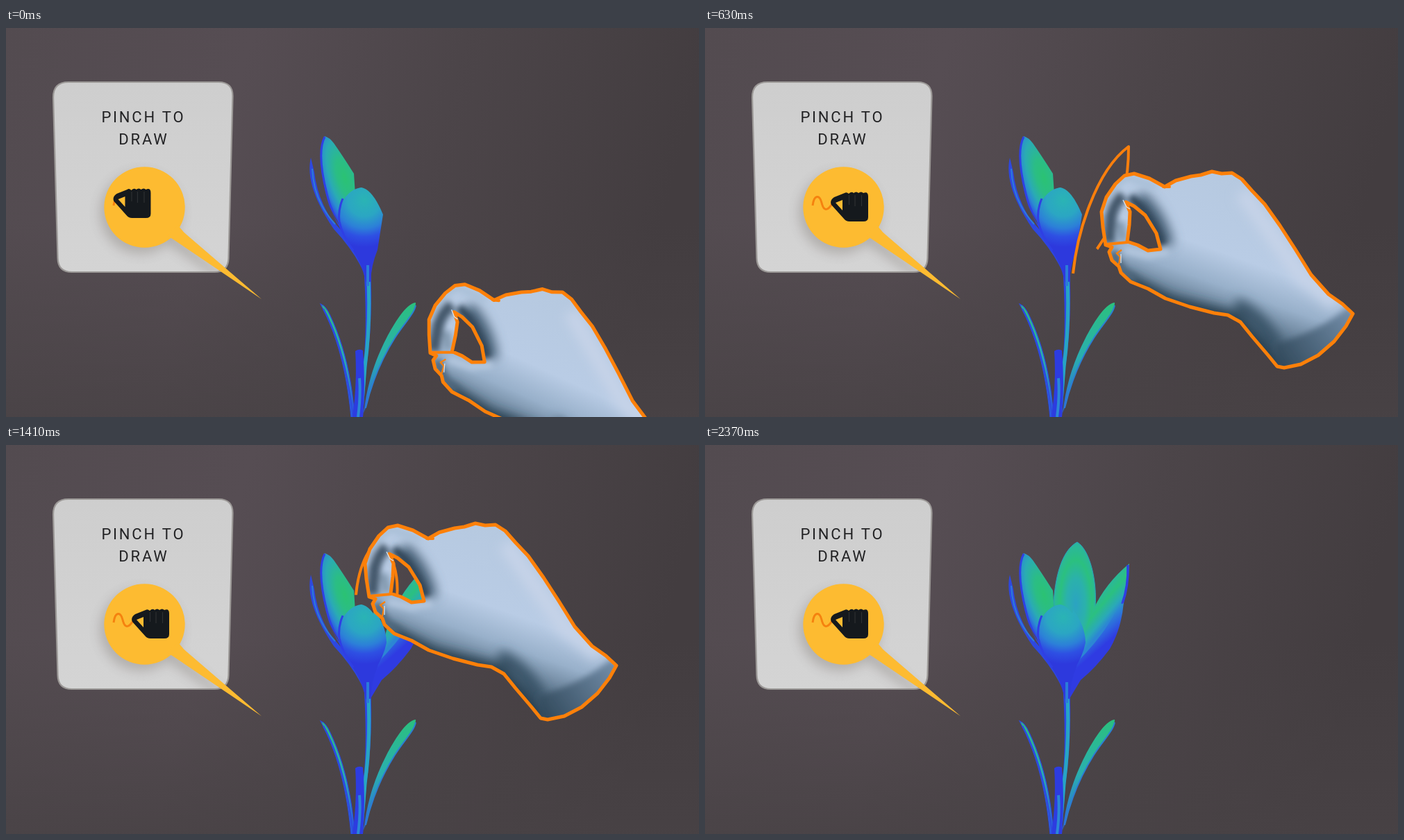
An HTML page that plays this animation: 998 px wide and 561 px high, repeating every 2.4 s.

```html
<!DOCTYPE html>
<html lang="en">
<head>
<meta charset="utf-8">
<title>Pinch to draw</title>
<style>
html, body { margin: 0; width: 100%; height: 100%; overflow: hidden; background: #4d464a; }
svg { display: block; width: 100vw; height: 100vh; }
text { font: 22px Roboto, sans-serif; letter-spacing: 2.8px; fill: #222224; }
.trail { fill: none; stroke: #fb7f0c; stroke-width: 4; stroke-linejoin: round; }
</style>
</head>
<body>
<svg viewBox="0 0 998 561" preserveAspectRatio="none">
<defs>
  <linearGradient id="bg" x1="0" y1="0" x2="1" y2=".15">
    <stop offset="0" stop-color="#534b50"/><stop offset=".35" stop-color="#564d53"/>
    <stop offset=".65" stop-color="#4c4549"/><stop offset="1" stop-color="#433d40"/>
  </linearGradient>
  <linearGradient id="floor" x1="0" y1="0" x2="0" y2="1">
    <stop offset=".5" stop-color="#484245" stop-opacity="0"/><stop offset="1" stop-color="#484245" stop-opacity=".85"/>
  </linearGradient>
  <linearGradient id="card" x1="0" y1="0" x2="0" y2="1">
    <stop offset="0" stop-color="#cecece"/><stop offset="1" stop-color="#d4d4d4"/>
  </linearGradient>
  <radialGradient id="bud" gradientUnits="userSpaceOnUse" cx="516" cy="248" r="68">
    <stop offset="0" stop-color="#2ab4b4"/><stop offset=".35" stop-color="#2ba6c3"/>
    <stop offset=".6" stop-color="#2c80d8"/><stop offset=".78" stop-color="#2e50e3"/><stop offset="1" stop-color="#2d39dd"/>
  </radialGradient>
  <radialGradient id="petalL" gradientUnits="userSpaceOnUse" cx="0" cy="0" r="1" gradientTransform="translate(488 216) rotate(-18) scale(36 92)">
    <stop offset="0" stop-color="#2bc273"/><stop offset=".3" stop-color="#2bbd85"/>
    <stop offset=".6" stop-color="#2aabb4"/><stop offset=".8" stop-color="#2b8ad2"/><stop offset="1" stop-color="#2f49e5"/>
  </radialGradient>
  <radialGradient id="petalC" gradientUnits="userSpaceOnUse" cx="0" cy="0" r="1" gradientTransform="translate(534 230) scale(34 94)">
    <stop offset="0" stop-color="#2ba3c2"/><stop offset=".4" stop-color="#2bb1ab"/>
    <stop offset=".68" stop-color="#2bc07f"/><stop offset="1" stop-color="#2bb3a6"/>
  </radialGradient>
  <linearGradient id="petalR" gradientUnits="userSpaceOnUse" x1="560" y1="215" x2="592" y2="242">
    <stop offset="0" stop-color="#2bb2a8"/><stop offset=".45" stop-color="#2bc080"/>
    <stop offset=".8" stop-color="#2aa9b8"/><stop offset="1" stop-color="#2c86d4"/>
  </linearGradient>
  <linearGradient id="flap" gradientUnits="userSpaceOnUse" x1="558" y1="262" x2="582" y2="290">
    <stop offset="0" stop-color="#2b98cb"/><stop offset=".45" stop-color="#2d68de"/><stop offset=".85" stop-color="#2f3be2"/>
  </linearGradient>
  <linearGradient id="leaf" x1="0" y1="0" x2="0" y2="1">
    <stop offset="0" stop-color="#2bc07e"/><stop offset=".5" stop-color="#2aaeb0"/><stop offset="1" stop-color="#2c62de"/>
  </linearGradient>
  <linearGradient id="skin" gradientUnits="userSpaceOnUse" x1="730" y1="195" x2="660" y2="392">
    <stop offset="0" stop-color="#b6c9e0"/><stop offset=".5" stop-color="#b9cce5"/>
    <stop offset=".72" stop-color="#98b0ca"/><stop offset="1" stop-color="#4a6378"/>
  </linearGradient>
  <linearGradient id="cuff" gradientUnits="userSpaceOnUse" x1="895" y1="390" x2="795" y2="460">
    <stop offset="0" stop-color="#6f89a4"/><stop offset="1" stop-color="#30485a"/>
  </linearGradient>
  <filter id="soft" x="-50%" y="-50%" width="200%" height="200%"><feGaussianBlur stdDeviation="8"/></filter>
  <filter id="soft2" x="-50%" y="-50%" width="200%" height="200%"><feGaussianBlur stdDeviation="4"/></filter>
  <path id="handShape" d="M549 291L545 265L543 243L550 222L563 203L576 191L590 188L612 195L634 207L650 198L672 192L686 190L702 185L716 188L731 187L745 196L760 213L778 232L800 263L822 297L845 334L870 362L890 376L905 390L895 408L878 430L855 450L830 463L806 468L796 466L783 450L760 423L743 402L725 392L705 389L670 380L635 368L610 354L585 344L571 331L568 322L558 313L554 301L558 294Z
    M584 243L583 262L580 286L595 291L610 299L628 297L622 274L606 248L590 235L578 229Z"/>
  <clipPath id="handClip"><use href="#handShape" clip-rule="evenodd"/></clipPath>
  <path id="cardShape" d="M90 78H306Q327 78 326.500 99L320.500 332Q320 352 300 352H95Q75 352 74.500 332L68 100Q68 78 90 78Z"/>
  <clipPath id="cardClip"><use href="#cardShape"/></clipPath>
</defs>

<rect width="998" height="561" fill="url(#bg)"/>
<rect width="998" height="561" fill="url(#floor)"/>

<!-- card -->
<use href="#cardShape" fill="url(#card)" stroke="#9b9896" stroke-width="2.200"/>
<text x="137.400" y="136">PINCH TO</text>
<text x="162.300" y="168">DRAW</text>
<g clip-path="url(#cardClip)">
  <g filter="url(#soft)" opacity=".3" transform="translate(-5 9)" fill="#6b625c">
    <circle cx="199" cy="258" r="59"/><path d="M236 302L368 391L250 287Z"/>
  </g>
</g>
<g fill="#fdbb31">
  <circle cx="199.500" cy="258.500" r="58.200"/>
  <path d="M231 299Q240 304 250 311L368 391L260 298Q252 291 248 284Z"/>
</g>
<path id="squiggle" d="M155 256C157 240 165 240 168 252C171 265 177 264 184 252" fill="none" stroke="#f5820f" stroke-width="3"/>
<g id="icon">
  <path fill="#15191d" fill-rule="evenodd" d="M186 244L201 238Q204 236 207 239Q211 235 214 238Q218 235 221 238Q225 235 228 238Q235 235 235 243V273Q235 279 228 279H208Q203 279 200 275L182 255Q179 249 186 244ZM188 252L198 248V263Z"/>
  <path d="M207.500 241V255M216 241V257M225.500 241V257" stroke="#2d3032" stroke-width="1.200"/>
</g>

<!-- stem and leaves -->
<path d="M453 398Q461 401 467 415Q496 476 502 561H497Q488 462 453 398Z" fill="url(#leaf)" stroke="#2d48e0" stroke-width="1.200"/>
<path d="M457 405Q488 462 500 561" fill="none" stroke="#2d4be0" stroke-width="2.500"/>
<path d="M590 396C576 397 558 428 548 447C530 482 520 515 515 555L519 545C527 510 541 477 560 447C575 425 590 412 590 396Z" fill="url(#leaf)"/>
<path d="M590 400C588 412 574 425 560 447C541 477 527 510 518 548" fill="none" stroke="#2c7cd4" stroke-width="1.800"/>
<path d="M515 340H525Q529 420 519 490L514 561H504L516 470Q520 420 515 340Z" fill="#2c48e2"/>
<path d="M521 344Q526 420 517 488L511 561" fill="none" stroke="#27a5c4" stroke-width="5.200"/>
<path d="M503 466Q508 462 514 465Q518 515 514 561H499Q506 510 503 466Z" fill="#2d3ce0"/>
<path d="M509 505Q511 530 507 561" fill="none" stroke="#2b87d6" stroke-width="4"/>

<!-- blossom -->
<path id="petal3" d="M536 140C512 153 504 195 502 228L513 290H549L562 235C565 195 554 151 536 140Z" fill="url(#petalC)" stroke="#2b9fbd" stroke-width="1"/>
<path d="M439 187C432 217 447 253 472 290Q502 322 517 356L518 330Q480 290 466 272Q448 242 444 208Z" fill="#2e48e0"/>
<path d="M441 203Q443 249 474 283" fill="none" stroke="#2c7cdb" stroke-width="2"/>
<path d="M459 156C449 172 453 205 461 239Q470 274 494 304L518 352L516 300L503 240L501 210Q484 183 472 166Q466 158 459 156Z" fill="url(#petalL)"/>
<path d="M459 157C450 174 454 207 462 239Q470 274 496 308L518 352" fill="none" stroke="#2f40e4" stroke-width="3"/>
<path d="M459 245Q474 280 507 319" fill="none" stroke="#51475c" stroke-width="1.200"/>
<g id="petal2">
  <path d="M611 171Q576 200 559 238Q546 264 544 290L530 330L545 330Q585 290 602 230Q610 205 611 171Z" fill="url(#petalR)"/>
  <path d="M609 173Q610 203 601 229" fill="none" stroke="#2f3ee3" stroke-width="3.500"/>
  <path d="M603 227Q600 264 583 294Q563 321 541 339L526 364L518 342L531 318Q570 280 590 243Z" fill="url(#flap)"/>
  <path d="M530 237Q548 262 548 285Q544 306 530 326L525 366L515 340Z" fill="url(#bud)"/>
</g>
<path d="M512 230C491 232 478 256 478 278Q482 298 497 318Q512 337 518 366L525 366Q526 342 535 320L543 269Q528 233 512 230Z" fill="url(#bud)"/>
<path d="M485 246Q478 262 480 279Q484 299 500 321" fill="none" stroke="#2f3fe4" stroke-width="3"/>
<path d="M521 342V372" stroke="#2b7bd8" stroke-width="4"/>

<path id="trail1" class="trail" pathLength="1" d="M530 354Q535 306 551 263Q575 197 610 171Q610 208 603 235Q592 280 565 318L530 354"/>
<path id="trail2" class="trail" pathLength="1" d="M562 230C568 188 555 148 536 141C518 150 507 184 504 216L505 232"/>

<g id="hand">
  <use href="#handShape" fill="url(#skin)" fill-rule="evenodd"/>
  <g clip-path="url(#handClip)">
    <g fill="none" filter="url(#soft)">
      <path d="M575 342L640 376L730 399L775 447L798 470" stroke="#253d4e" stroke-width="26"/>
      <path d="M735 378Q772 392 796 440" stroke="#3b5469" stroke-width="22"/>
      <path d="M595 222Q626 248 636 292" stroke="#4c6479" stroke-width="24"/>
      <path d="M745 215L830 335L880 375" stroke="#c6d3e8" stroke-width="22"/>
    </g>
    <g fill="none" filter="url(#soft2)">
      <path d="M584 222Q616 246 631 292" stroke="#2b4052" stroke-width="12"/>
      <path d="M574 219Q556 236 556 260L553 288" stroke="#44596c" stroke-width="17"/>
      <path d="M570 258L574 284" stroke="#8299af" stroke-width="11"/>
      <path d="M545 240Q553 211 580 193L622 208" stroke="#a9bfd7" stroke-width="9"/>
      <path d="M576 298L610 306L640 300" stroke="#b5c8df" stroke-width="10"/>
      <path d="M560 300Q566 324 592 342" stroke="#4d667b" stroke-width="12"/>
    </g>
    <path d="M792 434Q855 417 898 380L910 392L880 450L796 475Z" fill="url(#cuff)" filter="url(#soft2)"/>
  </g>
  <use href="#handShape" fill="none" stroke="#fd8009" stroke-width="5" stroke-linejoin="round"/>
  <path d="M632 207L641 207M549 290L581 287" stroke="#fd8009" stroke-width="4" stroke-linecap="round"/>
  <path d="M572 298L565 303L570 308L568 319" fill="none" stroke="#fd8009" stroke-width="2.200"/>
  <path d="M574 226L579 236L584 239M571 304L571 317" fill="none" stroke="#d9e6f0" stroke-width="1.300"/>
</g>
</svg>
<script>
const LOOP = 2400, STEP = 30;
const $ = id => document.getElementById(id);
const hand = $('hand'), icon = $('icon'), squiggle = $('squiggle');
const squiggleLen = squiggle.getTotalLength();

// time, x, y of the hand
const route = [
  [0, 62, 178], [180, -8, 62], [270, 0, 0], [450, 70, -114], [570, 62, -48],
  [630, 28, 22], [735, -6, 56], [870, -2, 30], [990, 14, 1], [1125, 36, -62],
  [1275, 0, -168], [1410, -26, -72], [1490, -22, -52], [1620, 36, 8],
  [1770, 55, 45], [1950, 84, 100], [2100, 91, 200], [2250, 82, 330], [2340, 76, 410], [2400, 74, 440]
];
const tilt = [[0, 5], [240, 0]];
const stroke1 = [[180, 0], [270, .18], [450, .5], [570, .68], [630, .88], [735, 1]];
const stroke2 = [[1125, 0], [1275, .48], [1410, .92], [1470, 1]];
const fill2 = 750, fill3 = 1500;

const clamp = x => Math.min(1, Math.max(0, x));

function linear(keys, t) {
  if (t <= keys[0][0]) return keys[0][1];
  for (let i = 1; i < keys.length; i++) {
    const [a, u] = keys[i - 1], [b, v] = keys[i];
    if (t <= b) return u + (v - u) * (t - a) / (b - a);
  }
  return keys[keys.length - 1][1];
}

function slope(keys, i, k) {
  const a = keys[Math.max(0, i - 1)], b = keys[Math.min(keys.length - 1, i + 1)], c = keys[i];
  const turns = (c[k] - a[k]) * (b[k] - c[k]) < 0;
  return turns ? 0 : (b[k] - a[k]) / (b[0] - a[0]);
}

function smooth(keys, t, k) {
  let i = 0;
  while (i < keys.length - 2 && t > keys[i + 1][0]) i++;
  const a = keys[i], b = keys[i + 1], d = b[0] - a[0], s = (t - a[0]) / d;
  const s2 = s * s, s3 = s2 * s;
  return (2 * s3 - 3 * s2 + 1) * a[k] + (s3 - 2 * s2 + s) * d * slope(keys, i, k)
    + (3 * s2 - 2 * s3) * b[k] + (s3 - s2) * d * slope(keys, i + 1, k);
}

function show(el, on) { el.style.display = on ? '' : 'none'; }

function drawTrail(el, p, on) {
  show(el, on && p > 0);
  el.setAttribute('stroke-dasharray', p + ' 2');
}

function render(t) {
  const x = smooth(route, t, 1), y = smooth(route, t, 2);
  hand.setAttribute('transform', `translate(${x} ${y}) rotate(${linear(tilt, t)} 551 291)`);

  const p = .18 + .82 * clamp(t / 250);
  const tip = squiggle.getPointAtLength(p * squiggleLen);
  squiggle.setAttribute('stroke-dasharray', p * squiggleLen + ' 200');
  icon.setAttribute('transform', `translate(${tip.x - 184} ${tip.y - 252})`);

  drawTrail($('trail1'), linear(stroke1, t), t < fill2);
  drawTrail($('trail2'), linear(stroke2, t), t < fill3);
  show($('petal2'), t >= fill2);
  show($('petal3'), t >= fill3);
}

const start = performance.now();
function tick() {
  const t = (performance.now() - start) % LOOP;
  render(Math.floor(t / STEP) * STEP);
  requestAnimationFrame(tick);
}
render(0);
requestAnimationFrame(tick);
</script>
</body>
</html>
```
